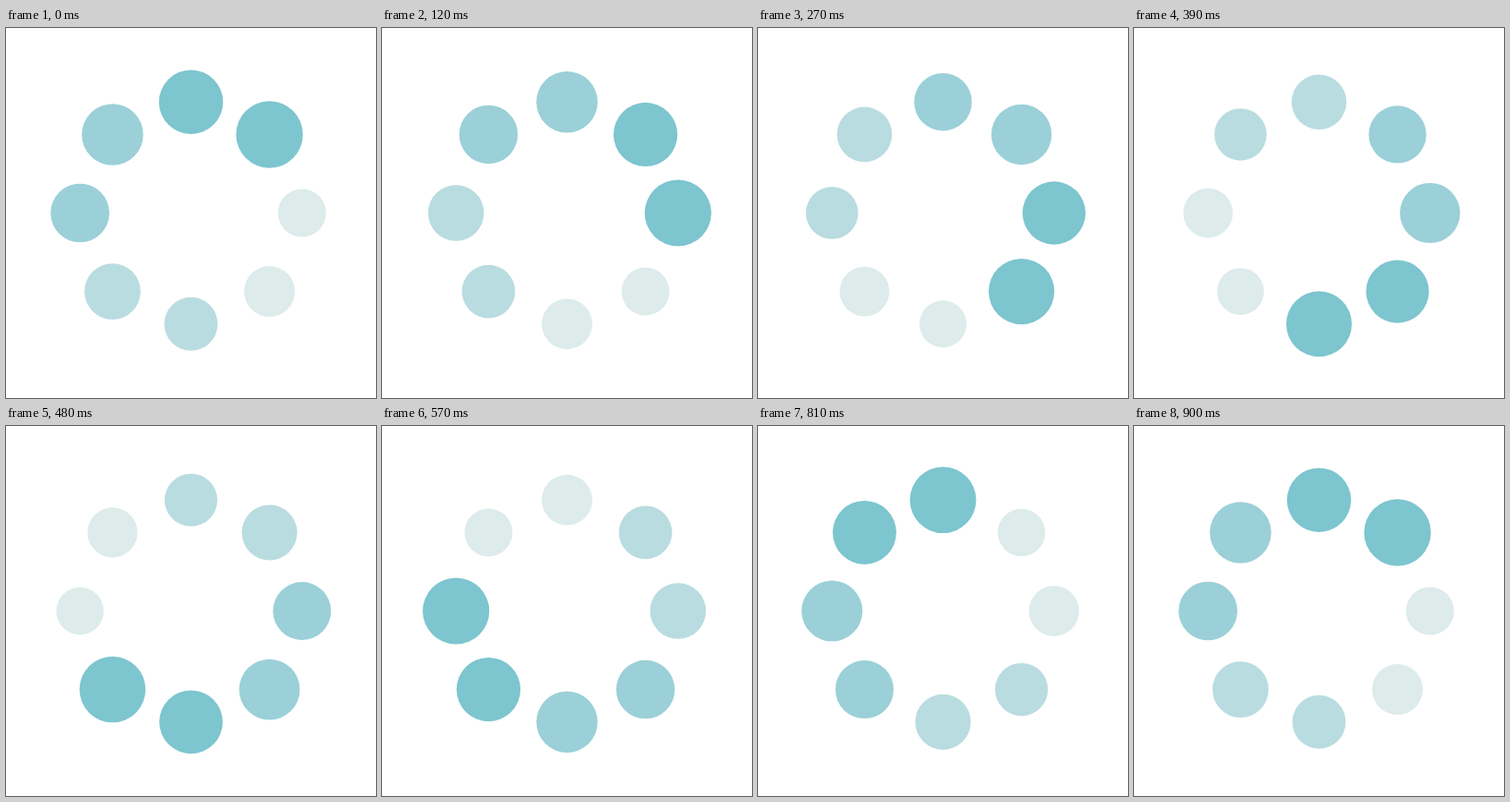
Recreate the animation shown at these times as an HTML page. Size 401 px wide and 401 px high, loop 930 ms.

```html
<!DOCTYPE html>
<html lang="en">
<head>
<meta charset="utf-8">
<title>Loading</title>
<style>
html, body { margin: 0; width: 100%; height: 100%; overflow: hidden; background: #fff; }
svg { display: block; width: 100%; height: 100%; }
</style>
</head>
<body>
<svg id="stage" viewBox="0 0 401 401"></svg>
<script>
const COUNT = 8, STEP = 30, STEPS = 30, LOOP = 930;
const CENTER = 200.5, RING = 120.3;
const R_MAX = 36.2, SHRINK = 11.6;
const COLORS = ['#7dc5cf', '#9bd0d8', '#b9dce0', '#ddebeb'];
const CYCLE = COUNT * STEPS;

const stage = document.getElementById('stage');

// Dots run clockwise, starting at the upper right.
const dots = Array.from({ length: COUNT }, (_, i) => {
  const angle = (i - 1) * Math.PI / 4;
  const dot = document.createElementNS('http://www.w3.org/2000/svg', 'circle');
  dot.setAttribute('cx', (CENTER + RING * Math.cos(angle)).toFixed(2));
  dot.setAttribute('cy', (CENTER + RING * Math.sin(angle)).toFixed(2));
  return stage.appendChild(dot);
});

// Each dot pops to full size in turn, then shrinks evenly and pales in four stages.
function draw(time) {
  const step = Math.floor((time % LOOP) / STEP) % STEPS;
  dots.forEach((dot, i) => {
    const age = (step * COUNT - i * STEPS + CYCLE) % CYCLE / CYCLE;
    dot.setAttribute('r', (R_MAX - SHRINK * age).toFixed(3));
    dot.setAttribute('fill', COLORS[Math.floor(age * COLORS.length)]);
  });
}

const start = performance.now();
function tick() {
  draw(performance.now() - start);
  requestAnimationFrame(tick);
}
tick();
</script>
</body>
</html>
```
